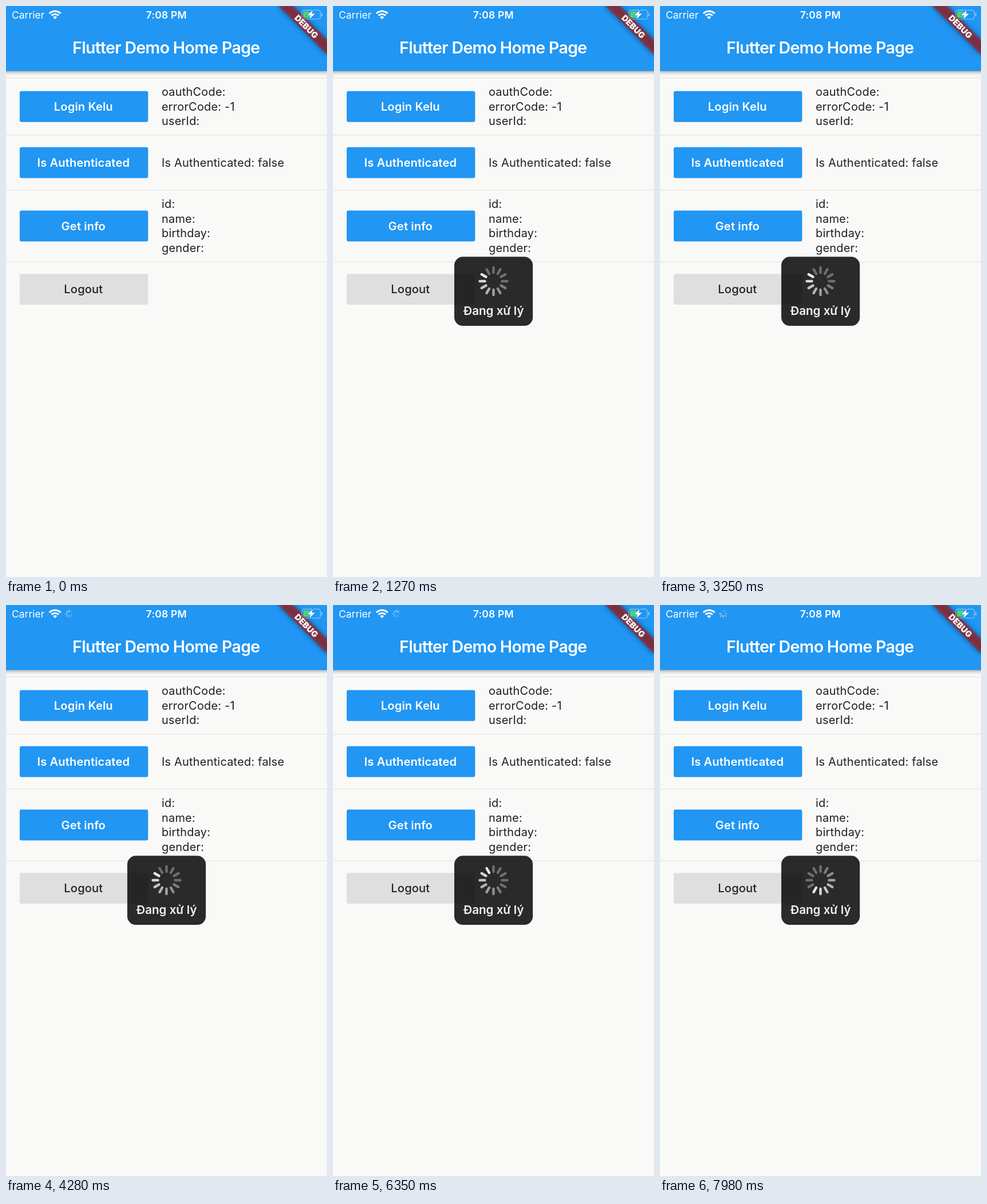
Animation, 561 px wide and 998 px high, one loop 8000 ms. Source, as an HTML page with a canvas:

```html
<!DOCTYPE html>
<html lang="en">
<head>
<meta charset="utf-8">
<title>Login demo</title>
<style>
  html, body { margin: 0; width: 100%; height: 100%; overflow: hidden; background: #f9f9f8; }
  canvas { display: block; width: 561px; height: 998px; }
</style>
</head>
<body>
<canvas id="stage" width="561" height="998"></canvas>
<script>
const W = 561, H = 998, LOOP = 8000, TICK = 86;
const PT = W / 375; // pixels per layout point
const BAR = 76 * PT;
const BLUE = '#2196f3', INK = '#212121';
const HUD_TICK = 6, NET_TICK = 42;
const STALLED = [22, 37, 39, 40, 41, 57, 66];
const ctx = document.getElementById('stage').getContext('2d');

function text(str, x, y, size, weight = 400, color = INK, align = 'left', spacing = 0) {
  ctx.font = `${weight} ${size}px Inter, "Open Sans", sans-serif`;
  ctx.letterSpacing = spacing + 'px';
  ctx.textAlign = align;
  ctx.fillStyle = color;
  ctx.fillText(str, x, y);
}

function box(x, y, w, h, r, color) {
  ctx.beginPath();
  ctx.roundRect(x, y, w, h, r);
  ctx.fillStyle = color;
  ctx.fill();
}

function button(label, top, bg = BLUE, color = '#fff', weight = 600) {
  const y = top * PT;
  box(16 * PT, y, 150 * PT, 36 * PT, 2 * PT, bg);
  text(label, 135.3, y + 34, 20.2, weight, color, 'center', 0.1);
}

function lines(rows, top) {
  rows.forEach((row, i) => text(row, 272, (top + 13.2 + i * 17) * PT, 20, 400, INK, 'left', 0.18));
}

function spinner(x, y, count, inner, outer, width, head, alphaAt) {
  ctx.lineCap = 'round';
  ctx.lineWidth = width;
  for (let i = 0; i < count; i++) {
    const age = (((head - i) % count) + count) % count;
    const a = i / count * Math.PI * 2 - Math.PI / 2;
    const c = Math.cos(a), s = Math.sin(a);
    ctx.strokeStyle = `rgba(255,255,255,${alphaAt(age)})`;
    ctx.beginPath();
    ctx.moveTo(x + c * inner, y + s * inner);
    ctx.lineTo(x + c * outer, y + s * outer);
    ctx.stroke();
  }
}

function appBar() {
  ctx.save();
  ctx.shadowColor = 'rgba(0,0,0,0.38)';
  ctx.shadowBlur = 7;
  ctx.shadowOffsetY = 2.5;
  ctx.fillStyle = BLUE;
  ctx.fillRect(-10, -10, W + 20, BAR + 10);
  ctx.restore();
  text('Flutter Demo Home Page', 279.8, 82.5, 28.6, 600, '#fff', 'center', -0.7);
}

function banner() {
  const near = 28 * PT, depth = 12 * PT;
  ctx.save();
  ctx.beginPath();
  ctx.rect(0, 0, W, BAR);
  ctx.clip();
  ctx.translate(W, 0);
  ctx.rotate(Math.PI / 4);
  ctx.filter = 'blur(5px)';
  ctx.fillStyle = 'rgba(0,0,0,0.5)';
  ctx.fillRect(-60, near, 120, depth);
  ctx.filter = 'none';
  ctx.fillStyle = 'rgba(183,28,28,0.627)';
  ctx.fillRect(-60, near, 120, depth);
  text('DEBUG', 0, 56.2, 14.6, 900, '#fff', 'center');
  ctx.restore();
}

function wifi(x, y) {
  const from = -Math.PI * 0.75, to = -Math.PI * 0.25;
  ctx.lineCap = 'butt';
  ctx.lineWidth = 3;
  ctx.strokeStyle = ctx.fillStyle = '#fff';
  for (const r of [14, 8.8]) {
    ctx.beginPath();
    ctx.arc(x, y, r, from, to);
    ctx.stroke();
  }
  ctx.beginPath();
  ctx.moveTo(x, y);
  ctx.arc(x, y, 5, from, to);
  ctx.fill();
}

function battery() {
  ctx.lineWidth = 1.4;
  ctx.strokeStyle = 'rgba(255,255,255,0.42)';
  ctx.beginPath();
  ctx.roundRect(517, 7.3, 32.5, 15.6, 4);
  ctx.stroke();
  box(551, 12.3, 2, 5.6, 1, 'rgba(255,255,255,0.45)');
  box(519.3, 9.6, 12, 11, 2, '#4cd964');
  ctx.beginPath();
  [[536, 7.5], [526.5, 16.2], [532, 16.2], [530.5, 22.5], [540, 13.6], [534.4, 13.6]]
    .forEach(([x, y]) => ctx.lineTo(x, y));
  ctx.closePath();
  ctx.strokeStyle = BLUE;
  ctx.lineWidth = 2;
  ctx.stroke();
  ctx.fillStyle = '#fff';
  ctx.fill();
}

function page() {
  ctx.fillStyle = '#f9f9f8';
  ctx.fillRect(0, 0, W, H);
  ctx.fillStyle = 'rgba(0,0,0,0.1)';
  for (const y of [84, 151, 215, 299]) ctx.fillRect(0, y * PT - 0.5, W, 1);

  button('Login Kelu', 99.5);
  button('Is Authenticated', 165);
  button('Get info', 239);
  button('Logout', 313, '#dfdfdf', INK, 500);

  lines(['oauthCode:', 'errorCode: -1', 'userId:'], 92);
  lines(['Is Authenticated: false'], 174.5);
  lines(['id:', 'name:', 'birthday:', 'gender:'], 223);
}

function statusBar(tick, time) {
  text('Carrier', 10, 21.8, 17.5, 400, '#fff');
  text('7:08 PM', 280.3, 21.8, 17.5, 600, '#fff', 'center', 0.2);
  wifi(85.7, 23);
  battery();
  if (tick >= NET_TICK) {
    spinner(110.5, 15.3, 8, 3.4, 6.6, 1.3, Math.floor(time * 0.008 + 6.7),
      age => 0.85 - age * 0.1);
  }
}

function hud(time) {
  box(212, 438.3, 137.2, 120.8, 15, 'rgba(0,0,0,0.83)');
  // Twelve spokes, one full turn per second.
  spinner(280.5, 481, 12, 15, 24, 4.4, Math.floor(time * 0.012 + 7.5),
    age => Math.max(0.32, 0.9 - age * 0.085));
  text('Đang xử lý', 280.6, 539.5, 20.6, 600, '#f2f2f2', 'center');
}

function draw(now) {
  const t = now % LOOP;
  let tick = Math.floor((t - 488) / TICK);
  while (STALLED.includes(tick)) tick--;
  const time = 500 + tick * TICK;
  page();
  appBar();
  banner();
  statusBar(tick, time);
  if (tick >= HUD_TICK) hud(time);
}

const start = performance.now();
function loop() {
  draw(performance.now() - start);
  requestAnimationFrame(loop);
}
loop();
</script>
</body>
</html>
```
